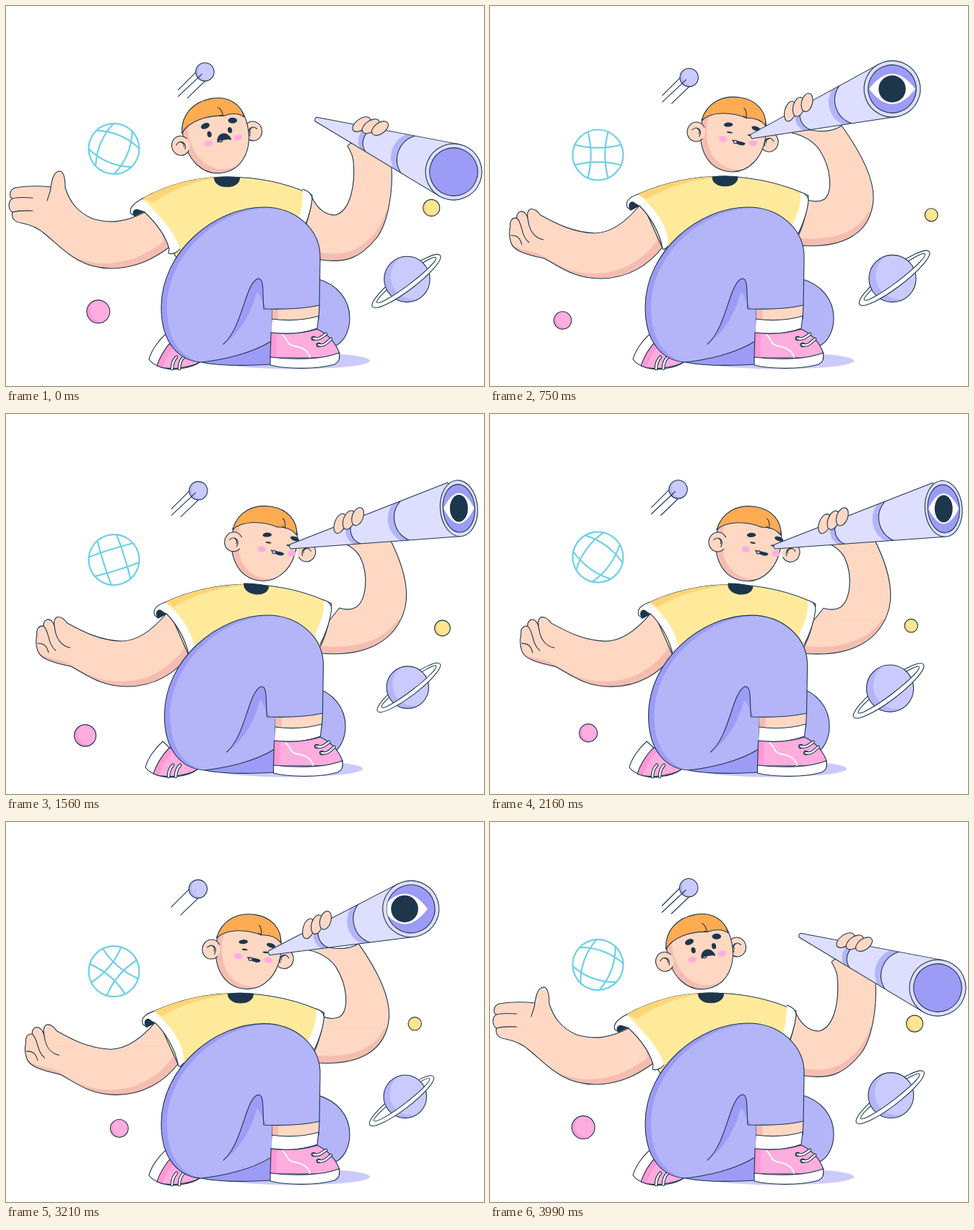
An HTML page with a canvas that plays this animation: 662x527 px, repeating every 4020 ms.

```html
<!DOCTYPE html>
<html lang="en">
<head>
<meta charset="utf-8">
<title>Stargazer</title>
<style>
html, body { margin: 0; width: 100%; height: 100%; overflow: hidden; background: #fff; }
canvas { display: block; width: 662px; height: 527px; }
</style>
</head>
<body>
<canvas id="stage" width="662" height="527"></canvas>
<script>
const ctx = document.getElementById('stage').getContext('2d');
const LOOP = 4020, STEP = 30, TAU = Math.PI * 2;
const INK = '#1d364c', SKIN = '#ffd8c4', BLUSH = '#f5bdb0', HAIR = '#ffab52',
  SUN = '#ffea9b', AMBER = '#ffd576', LILAC = '#b4b4f9', VIOLET = '#9c9cf7',
  PALE = '#dedeff', MIST = '#cbcaff', PINK = '#ffacdf', ROSE = '#ff98d6', SKY = '#6dd0ea';

// Motion rules
const lerp = (a, b, u) => a + (b - a) * u;
function ramp(t, from, to) {
  const u = Math.min(1, Math.max(0, (t - from) / (to - from)));
  return u * u * (3 - 2 * u);
}
const hump = (t, peak) => ramp(t, peak - 300, peak) - ramp(t, peak, peak + 300);
const wave = (t, mean, swing, peak, period = LOOP) => mean + swing * Math.cos(TAU * (t - peak) / period);

// pose: 0 surprised, 1 looking; far: 1 when leaning right; dip: sinking between moves
let pose = 0, far = 0, dip = 0;
function setPose(t) {
  pose = ramp(t, 0, 470) - ramp(t, 3150, 3770);
  far = ramp(t, 950, 1600) - ramp(t, 2150, 2650);
  dip = 4 * hump(t, 390) + 5 * hump(t, 1110) + 4 * hump(t, 2420) + 4 * hump(t, 3400);
}

// Drawing helpers; a pair of paths is blended by the pose
const numbers = /-?[\d.]+/g;
function outline(path) {
  if (typeof path === 'string') return new Path2D(path);
  const goal = path[1].match(numbers);
  let i = 0;
  return new Path2D(path[0].replace(numbers, v => lerp(+v, +goal[i++], pose).toFixed(2)));
}
function draw(path, fill, line = INK, width = 1.1) {
  const p = outline(path);
  if (fill) { ctx.fillStyle = fill; ctx.fill(p); }
  if (line) { ctx.strokeStyle = line; ctx.lineWidth = width; ctx.stroke(p); }
}
function oval(x, y, rx, ry, fill, line, turn = 0, from = 0, to = TAU) {
  ctx.beginPath();
  ctx.ellipse(x, y, rx, ry, turn, from, to);
  if (fill) { ctx.fillStyle = fill; ctx.fill(); }
  if (line) { ctx.strokeStyle = line; ctx.lineWidth = 1.1; ctx.stroke(); }
}
function group(fn, x = 0, y = 0, turn = 0) {
  ctx.save();
  ctx.translate(x, y);
  ctx.rotate(turn);
  fn();
  ctx.restore();
}
// Shade is what a shifted copy of the shape leaves bare, below the given height
function shaded(path, light, shade, dx, dy, top = -99, line = INK) {
  const p = outline(path);
  ctx.fillStyle = light;
  ctx.fill(p);
  group(() => {
    ctx.clip(p);
    ctx.beginPath();
    ctx.rect(-99, top, 900, 700);
    ctx.clip();
    ctx.fillStyle = shade;
    ctx.fill(p);
    ctx.translate(dx, dy);
    ctx.fillStyle = light;
    ctx.fill(p);
  });
  if (line) { ctx.strokeStyle = line; ctx.lineWidth = 1.1; ctx.stroke(p); }
}
const disc = r => `M${r} 0A${r} ${r} 0 1 1 ${-r} 0A${r} ${r} 0 1 1 ${r} 0Z`;
const ball = (x, y, r, light, shade) =>
  group(() => shaded(disc(r), light, shade, r * .28, -r * .12), x, y);

function comet(t) {
  const tail = 1 - ramp(t, 2250, 2700) + ramp(t, 3450, 3950);
  group(() => {
    draw('M-12 0L-37 25M2 11L-24 36', null);
    ball(0, 0, 12.7, MIST, LILAC);
    draw(`M-4 3L${-4 - 33 * tail} ${3 + 31 * tail}`, null);
  }, wave(t, 268.5, 8.5, 390), wave(t, 98.5, 8, 1700));
}

function globe(t) {
  const bulge = wave(t, 14, 12, 0, 2010);
  group(() => {
    draw(disc(35), null, SKY, 2.2);
    for (let i = 0; i < 4; i++) {
      draw(`M-32 -14Q0 ${-bulge} 32 -14`, null, SKY, 2.2);
      ctx.rotate(TAU / 4);
    }
  }, 149.5, wave(t, 203, -5, 0, 2010), Math.PI * (t - 750) / 2010);
}

function saturn(t) {
  const x = wave(t, 555, 2.5, 900), y = wave(t, 379.6, -1.6, 750), r = wave(t, 31.3, 2.2, 450, 2010);
  const half = side => group(() => {
    ctx.scale(r / 31.5, r / 31.5);
    ctx.beginPath();
    ctx.rect(-70, side, 140, 30);
    ctx.clip();
    ctx.beginPath();
    ctx.ellipse(0, 0, 58.5, 12.5, 0, 0, TAU);
    ctx.ellipse(1, -1, 51, 7, 0, 0, TAU);
    ctx.fillStyle = '#fff';
    ctx.fill('evenodd');
    oval(0, 0, 58.5, 12.5, null, INK);
    oval(1, -1, 51, 7, null, INK);
  }, x + wave(t, -1, 4, 1000), y + wave(t, 2.5, -3.5, 1000), -.65);
  half(-30);
  ball(x, y, r, MIST, LILAC);
  half(0);
}

function sky(t) {
  comet(t);
  globe(t);
  ball(wave(t, 589, 24, 1000), wave(t, 287.5, 9.5, 1600), wave(t, 10.2, 1.3, 0, 1340), '#ffe68e', AMBER);
  ball(wave(t, 128.5, 30, 3000), wave(t, 434, 12, 1650), wave(t, 14, 2, 0, 1340), PINK, ROSE);
  saturn(t);
}

function lace(path) {
  draw(path, null, INK, 4.6);
  draw(path, null, '#fff', 2.4);
}

function backShoe() {
  draw('M222 454C211 464 201 478 198 490C205 500 225 506 240 503C252 502 262 499 270 493L245 475Z', '#fff');
  shaded('M231 463C220 474 212 489 209 499C225 506 255 502 270 493L262 470Z', PINK, ROSE, 8, 2);
  lace('M230 503C230 497 232 491 236 487');
  lace('M240 503C240 497 242 491 246 487');
}

function frontLeg() {
  const seat = 'M357 420C384 421 412 420 434 415L435 352C437 309 400 279 357 279C290 279 215 340 215 418C215 468 240 492 270 494C300 500 335 499 367 497';
  const fold = 'M301 469C328 446 331 384 349 378C358 377 355 398 357 420';
  const crease = 'M270 494C300 491 340 482 367 465';
  shaded('M368 417L434 414L433 434L368 440Z', SKIN, BLUSH, 9, 0);
  draw('M368 434C390 437 412 436 433 430L431 447C412 454 390 456 367 453Z', '#fff');
  shaded(seat + 'L368 419Z', LILAC, VIOLET, 8, 1, -99, null);
  draw(crease + 'L367 497C335 499 300 500 270 494Z', VIOLET, null);
  draw(fold + 'L362 420C352 408 351 395 347 398C340 424 326 452 301 469Z', VIOLET, null);
  draw(seat + fold + crease, null);
  shaded('M367 453C390 456 412 454 431 448C443 454 456 465 462 482L440 488L366 488Z', PINK, ROSE, 8, 0);
  draw('M383 456C392 464 387 470 402 472C415 475 420 482 421 488', null, '#fff', 1.8);
  oval(426, 461, 3, 2.6, SUN, INK);
  oval(433, 470, 3, 2.6, SUN, INK);
  lace('M426 461C434 463 437 459 443 455');
  lace('M433 470C441 472 445 466 450 462');
  draw('M366 487C400 491 440 490 461 481C463 488 461 494 455 497C430 504 390 504 366 498Z', '#fff');
}

function legs() {
  const floor = 498, squash = 1 - dip * .0024;
  oval(400 - 10 * far, 492, 104, 11.5, MIST);
  ctx.save();
  ctx.transform(1, 0, 0, squash, 0, floor * (1 - squash));
  group(backShoe, -5 * far);
  group(() => draw('M430 378C460 386 476 408 476 433C476 452 467 466 457 471L425 471Z', LILAC), -6 * far);
  group(frontLeg, 4.5 * far);
  ctx.restore();
}

function rightArm() {
  ctx.transform(1, 0, -.19 * far, 1, 73 * far, dip);
  shaded(['M424 266C433 284 445 290 456 290C478 284 484 245 481 215C480 205 476 200 473 194C478 188 484 188 492 191C510 205 525 215 534 222C536 255 530 300 513 322C490 350 470 357 436 352L405 320Z',
    'M440 269C450 272 458 271 463 268C475 258 473 225 456 199C448 188 436 180 418 176C420 170 430 172 445 172C465 176 478 172 487 166C515 205 532 240 531 268C528 315 490 337 427 332L415 310Z'],
  SKIN, BLUSH, 0, -10, 285);
}

function leftArm() {
  shaded(['M192 286C165 300 145 302 120 295C97 285 88 270 82 252C82 240 80 229 74 229C66 230 64 240 62 251C45 249 25 250 13 252C4 255 4 265 9 267C3 270 2 282 9 286C7 293 11 300 22 301C32 303 45 308 55 317C80 338 100 363 145 364C180 364 205 350 227 334L222 292Z',
    'M207 277C185 303 165 315 145 315C115 314 92 302 70 290C66 284 60 280 55 282C50 286 52 292 53 299C52 290 48 284 42 285C37 287 37 291 37 294C30 293 27 299 28 306C26 314 27 322 29 328C32 338 45 344 75 350C95 360 115 378 153 378C190 378 220 360 240 333L236 292Z'],
  SKIN, BLUSH, -9, -7, 310);
  draw(['M62 251C62 258 58 265 57 270M9 267C18 264 28 266 37 266M9 286C18 283 28 284 37 284',
    'M53 299C55 312 62 322 74 324M37 294C46 302 42 318 54 328M29 318C38 318 42 322 44 331'], null);
}

function shirt() {
  draw(['M189 267C225 247 262 237 305 237C350 237 390 246 424 262C424 280 418 295 414 308L330 380L236 349Z',
    'M205 261C245 243 285 236 325 236C370 238 410 248 441 263C440 285 432 310 425 322L330 380L239 336Z'], SUN);
  draw(['M189 267C225 247 262 237 305 237C265 241 232 253 204 273Z',
    'M205 261C245 243 285 236 325 236C283 241 248 249 217 268Z'], AMBER, null);

  const hem = ['M411 254C420 257 424 261 424 268C422 285 416 302 412 308',
    'M430 258C437 260 441 264 441 270C439 290 430 310 425 319'];
  draw([hem[0] + 'L404 300C409 285 411 270 411 254Z', hem[1] + 'L417 306C426 290 431 275 430 258Z'], '#fff', null);
  draw(hem, null);

  const rim = ['M189 267C176 274 170 281 173 288L178 291L191 285C207 300 221 318 226 337L225 343C230 345 237 342 241 337',
    'M205 261C193 265 187 271 190 279L195 283L207 277C223 293 235 315 239 336L239 337C241 338 244 336 246 333'];
  draw([rim[0] + 'C236 315 213 291 189 267Z', rim[1] + 'C250 311 229 280 205 261Z'], '#fff', null);
  draw(rim, null);
  draw(['M176 288C176 283 180 281 184 283L190 285L178 291Z', 'M193 279C192 272 197 270 201 274L206 277L195 283Z'], INK);
  group(() => draw('M-17.5 0C-17.5 17 17.5 17 17.5 0Q0 -2 -17.5 0Z', INK),
    lerp(306, 325.5, pose) + 9 * far, lerp(238, 237, pose), .12 * far);
}

function ear(side) {
  group(() => {
    ctx.scale(side, 1);
    oval(0, 0, 12.5, 13.5, SKIN);
    oval(0, 0, 12.5, 13.5, null, INK, 0, .22 * Math.PI, 1.8 * Math.PI);
    draw('M-6 -2C0 -9 9 -4 5 6M0 -5C4 -4 5 -1 4 2', null);
  }, 9 * far - 51 * side, 2.6);
}

function features() {
  const brow = 4 * pose;
  draw(['M0 8C1 -5 16 -6 19 8C13 6 5 6 0 8Z', 'M0 7C6 8 12 7 18 9C18 14 6 12 0 7Z'], INK);
  oval(4.5, lerp(7.4, 9, pose), 2.5, lerp(1.3, 2.2, pose), PINK, INK);
  for (const side of [-1, 1]) {
    oval(8 + 21 * side, 7.3, 5.8, 4, PINK);
    oval(7 + 19.3 * side + brow, -17.4 + brow, 6.3, lerp(4, 3, pose), INK, null, .2 * side);
    oval(5.5 + 14.5 * side + brow, -5 + brow / 2, lerp(3, 4, pose), lerp(4.2, 1.1, pose), INK);
  }
}

function head() {
  ear(-1);
  shaded('M-45 -14C-48 25 -28 51 0 51C28 51 47 25 45 -10C44 -25 40 -30 36 -34C0 -45 -35 -40 -45 -14Z',
    SKIN, BLUSH, 8, -4, -20);
  ear(1);
  draw('M-46 -14C-42 -40 -22 -53 2 -53C26 -53 42 -38 43 -19C36 -26 26 -28 15 -26C-8 -32 -34 -28 -46 -14Z', HAIR);
  group(() => {
    draw('M10 -39C15 -36 14 -31 15 -26L11 -28', null);
    features();
  }, 11 * far);
}

function scope() {
  const x = lerp(429, 362, pose) + 32 * far + dip * .5, y = lerp(157, 181, pose) + 3 * far + dip;
  const lx = lerp(620, 557, pose) + 71 * far + dip * 1.7, ly = lerp(230, 115, pose) + 16 * far + dip * 2;
  const len = Math.hypot(lx - x, ly - y), angle = Math.atan2(ly - y, lx - x);
  const flat = 1 - .34 * far, tilt = angle * (1 - .65 * far);

  group(() => {
    const tube = new Path2D(`M0 -3L${len - 7} -38.4L${len} 0L${len - 7} 38.4L0 3Q-2 0 0 -3Z`);
    ctx.fillStyle = PALE;
    ctx.fill(tube);
    ctx.save();
    ctx.clip(tube);
    for (const [f, r, band] of [[.42, 18, 7], [.73, 31, 9]]) {
      oval(len * f - band / 2, 0, r, r + 2, LILAC);
      oval(len * f + band / 2, 0, r, r + 2, PALE, INK);
      ctx.fillStyle = PALE;
      ctx.fillRect(len * f + band / 2, -45, 90, 90);
    }
    ctx.restore();
    ctx.strokeStyle = INK;
    ctx.stroke(tube);
  }, x, y, angle);

  group(() => {
    oval(0, 0, 39 * flat, 39, PALE, INK);
    oval(0, 0, 33.3 * flat, 33.3, VIOLET, INK);
    ctx.clip();
    ctx.rotate(-tilt);
    ctx.scale(flat, 1);
    ctx.translate(-75 * Math.min(1, 4.4 * (1 - pose)), 0);
    draw('M-32 0Q0 -42 32 0Q0 42 -32 0Z', '#fff', null);
    oval(0, 0, 18.8, 18.8, INK);
  }, lx, ly, tilt);

  group(() => {
    for (const i of [-1, 0, 1]) oval(len * .365 + i * 13, -18 - i * 2, 7.6, 13.6 - i * .6, SKIN, INK, .58);
  }, x, y, angle);
}

function render(t) {
  setPose(t);
  ctx.setTransform(1, 0, 0, 1, 0, 0);
  ctx.fillStyle = '#fff';
  ctx.fillRect(0, 0, 662, 527);
  ctx.lineJoin = ctx.lineCap = 'round';

  sky(t);
  group(rightArm);
  group(leftArm, 15 * far, dip * .6);
  group(() => {
    ctx.scale(1 - .024 * far, 1);
    shirt();
  }, 20.5 * far, dip);
  legs();
  group(head, lerp(291.5, 336.5, pose) + 21 * far, lerp(181, 179, pose) + 1.3 * dip + 1.5 * far, lerp(-.2, .14, pose));
  scope();
}

const start = performance.now();
function tick() {
  const t = (performance.now() - start) % LOOP;
  render(Math.floor(t / STEP) * STEP);
  requestAnimationFrame(tick);
}
tick();
</script>
</body>
</html>
```
